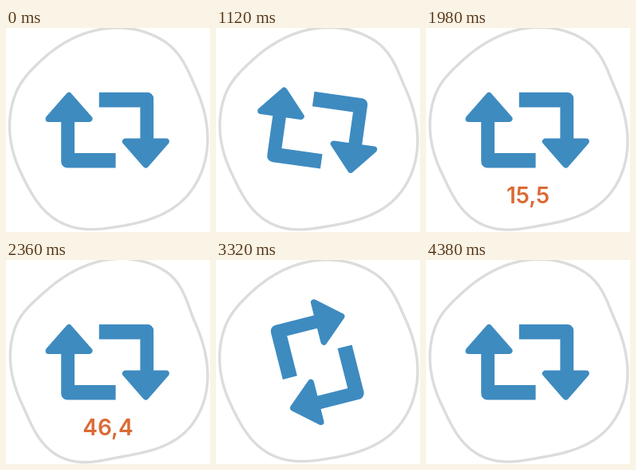
These frames come from a looping animation (256x256 px, 4400 ms). An HTML page:

```html
<!DOCTYPE html>
<html lang="en">
<head>
<meta charset="utf-8">
<title>Repeat</title>
<style>
  html, body { margin: 0; width: 100%; height: 100%; overflow: hidden; background: #fff; }
  svg { display: block; width: 100%; height: 100%; }
  text { font: 600 28px Inter, Roboto, sans-serif; fill: #da6a34; text-anchor: middle; }
</style>
</head>
<body>
<svg viewBox="0 0 256 256">
  <defs>
    <g id="arrow" fill="#3e8bc0">
      <path d="M69.2 112H86V157H137.6V175.6H77A7.8 7.8 0 0 1 69.2 167.8Z"/>
      <path d="M79 84.8L104.5 114H53.5Z" stroke="#3e8bc0" stroke-width="8" stroke-linejoin="round"/>
    </g>
  </defs>
  <path id="ring" fill="none" stroke="#dcdcdd" stroke-width="3.4" stroke-linejoin="round"/>
  <g id="icon">
    <use href="#arrow"/>
    <use href="#arrow" transform="rotate(180 127.2 128.2)"/>
  </g>
  <text id="count" x="128" y="220"></text>
</svg>
<script>
const LOOP = 4400, TICK = 20;
const RING_STEP = 200, RING_SHAPES = 4;
const ring = document.getElementById('ring');
const icon = document.getElementById('icon');
const count = document.getElementById('count');

// Bumps and dents of the hand-drawn ring: [degrees clockwise from the right, offset]
const bumps = [[37, 5], [80, -4], [117, 7], [155, -4], [200, -1], [228, -6], [302, 7], [336, -5]];

const clamp01 = v => Math.min(1, Math.max(0, v));
const progress = (t, start, length) => clamp01((t - start) / length);
const mix = (a, b, k) => a + (b - a) * k;
const ease = k => (1 - Math.cos(Math.PI * k)) / 2;

function bumpAt(degrees) {
  const next = bumps.findIndex(([angle]) => angle > degrees);
  const [endAngle, end] = bumps[Math.max(next, 0)];
  const [startAngle, start] = bumps.at(next < 1 ? -1 : next - 1);
  const turn = a => (a + 360) % 360;
  return mix(start, end, ease(turn(degrees - startAngle) / turn(endAngle - startAngle)));
}

// Each redraw of the ring is rougher than the last, then it starts over
const roughness = index => 0.8 + 0.14 * (index % RING_SHAPES);

function ringPath(t) {
  const index = Math.floor(t / RING_STEP);
  const blend = t % RING_STEP >= RING_STEP - TICK ? 0.5 : 0;
  const rough = mix(roughness(index), roughness(index + 1), blend);
  const points = [];
  for (let degrees = 0; degrees < 360; degrees += 3) {
    const angle = degrees * Math.PI / 180;
    const r = 125.5 + rough * bumpAt(degrees);
    points.push(`${(128.3 + r * Math.cos(angle)).toFixed(2)} ${(127.3 + r * Math.sin(angle)).toFixed(2)}`);
  }
  return `M${points.join('L')}Z`;
}

// Four shakes, a pause for the counter, then one full turn
function iconAngle(t) {
  if (t >= 600 && t < 1800) return -8 * Math.sin((t - 600) / 300 * 2 * Math.PI);
  return 360 * progress(t, 3240, 380);
}

function countText(t) {
  if (t < 1800 || t >= 3200) return '';
  return (100 * progress(t, 1789, 1231)).toFixed(1).replace('.', ',');
}

function draw(t) {
  ring.setAttribute('d', ringPath(t));
  icon.setAttribute('transform', `rotate(${iconAngle(t).toFixed(3)} 127.2 128.2)`);
  count.textContent = countText(t);
}

const start = performance.now();
function frame() {
  const t = (performance.now() - start) % LOOP;
  draw(Math.floor(t / TICK) * TICK);
  requestAnimationFrame(frame);
}
frame();
</script>
</body>
</html>
```
